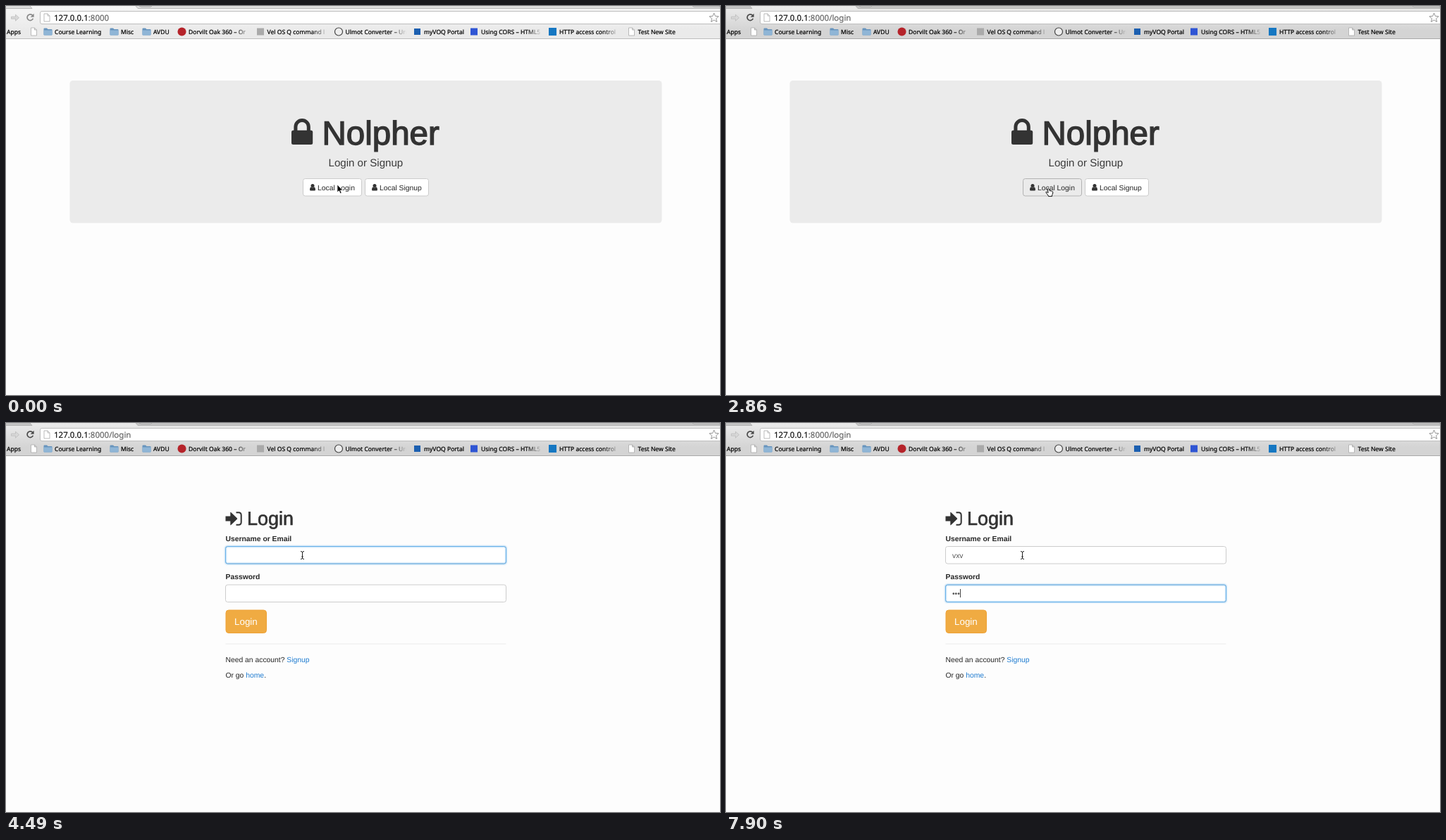
Recreate the animation shown at these times as an HTML page. Size 1013x553 px, loop 8 s.

```html
<!DOCTYPE html>
<html lang="en">
<head>
<meta charset="utf-8">
<title>Login demo</title>
<style>
  html, body { margin: 0; width: 100%; height: 100%; overflow: hidden; background: #fdfdfd; }
  svg { display: block; width: 1013px; height: 553px; }
  text { font: 10.35px "Liberation Sans", Arial, sans-serif; fill: #262626; text-rendering: geometricPrecision; white-space: pre; }
  .ui { font: 8.55px "Noto Sans", sans-serif; fill: #000; stroke: #000; stroke-width: .22px; }
  .faded { stroke: none; }
  .url { font: 11.5px "Noto Sans", sans-serif; fill: #111; stroke: #111; stroke-width: .2px; }
  .url .rest { fill: #666; stroke: #666; }
  .option { font: 10.5px "Noto Sans", sans-serif; fill: #000; stroke: #000; stroke-width: .25px; }
  .label { font-weight: bold; }
  .title { fill: #333; stroke: #333; }
  .typed { fill: #555; }
  .link { fill: #1f7cd0; }
  .button { fill: #fff; stroke: #ccc; }
  .button.hover { fill: #ebebeb; stroke: #b3b3b3; }
  .field { fill: #fff; stroke: #ccc; }
  .glow { fill: none; stroke: #66afe9; }
</style>
</head>
<body>
<svg viewBox="0 0 1013 553" xmlns="http://www.w3.org/2000/svg">
  <defs>
    <linearGradient id="barFill" x2="0" y2="1">
      <stop id="barTop"/><stop id="barEnd" offset=".75"/>
    </linearGradient>
    <path id="file" d="M-3.500-5.500h5l3 3v8h-8zM1.500-5.500v3h3" fill="#fff" stroke="#aaa" stroke-width=".8"/>
    <g id="folder">
      <path d="M-6-4q0-1 1-1h3.500l1.500 1.500h5q1 0 1 1v6.500q0 1-1 1h-10q-1 0-1-1z" fill="#6794bd"/>
      <path d="M-6-2h12v6q0 1-1 1h-10q-1 0-1-1z" fill="#8fb5d6"/>
    </g>
    <g id="person" fill="#333">
      <circle cx="4" cy="2.500" r="2.500"/>
      <path d="M1.800 4.300Q4 6 6.200 4.300Q8 4.800 8 8Q8 9.500 6.700 9.500H1.300Q0 9.500 0 8Q0 4.800 1.800 4.300z"/>
    </g>
  </defs>

  <rect width="1013" height="553" fill="#fdfdfd"/>

  <g id="browser">
    <rect width="1013" height="46" fill="url(#barFill)"/>
    <path id="tabStrip" d="M0 0H34L37 3.500H0zM184 0H1013V3.500H187z"/>
    <path d="M0 3.500H37L34 0M184 0L187 3.500H1013" fill="none" stroke="#adadad" stroke-width=".8"/>
    <path d="M189 0h18l-2 1.500h-13zM974 0h39v1.500h-37z" fill="#ddd" stroke="#999" stroke-width=".6"/>
    <path id="barLine" d="M0 46.500H1013"/>
    <path d="M7.500 15.200h6v-3l5 4.500-5 4.500v-3h-6z" fill="#d8d8d8" stroke="#bbb" stroke-width=".8"/>
    <g id="reload">
      <path d="M37.800 13.600A4.300 4.300 0 1 0 38.400 17.800" fill="none" stroke="currentColor" stroke-width="1.700"/>
      <path d="M39.600 10.800v5h-5z" fill="currentColor"/>
    </g>
    <rect x="48.500" y="7.500" width="980" height="18" rx="2.500" fill="#fff" stroke="#bdbdbd"/>
    <use href="#file" x="57.500" y="16.500"/>
    <text class="url" x="68" y="20.500">127.0.0.1<tspan class="rest">:8000</tspan><tspan class="rest" id="path"></tspan></text>
    <path d="M1004.500 10l1.900 4.400 4.700.4-3.600 3.100 1.100 4.600-4.100-2.500-4.100 2.500 1.100-4.600-3.600-3.100 4.700-.4z" fill="#fff" stroke="#888" stroke-width=".9"/>
    <g id="bookmarks"></g>
  </g>

  <g id="home">
    <rect x="90.500" y="106" width="840" height="202.500" rx="4.500" fill="#ebebeb"/>
    <path d="M410.900 178v-6.200a9.200 9.200 0 0 1 18.400 0v6.200" fill="none" stroke="#333" stroke-width="5"/>
    <rect x="405" y="176.800" width="30.200" height="20.200" rx="2.500" fill="#333"/>
    <text class="title" x="448.500" y="197" style="font-size:47.500px" stroke-width="1.400">Nolpher</text>
    <text x="457.500" y="227.500" style="font-size:15.100px;fill:#3c3c3c">Login or Signup</text>
    <rect id="loginButton" class="button" x="421.500" y="245.500" width="83" height="24.500" rx="3"/>
    <use href="#person" x="431" y="253"/>
    <text x="442" y="261.500">Local Login</text>
    <rect class="button" x="509.500" y="245.500" width="90" height="24.500" rx="3"/>
    <use href="#person" x="519" y="253"/>
    <text x="530" y="261.500">Local Signup</text>
  </g>

  <g id="login">
    <path d="M311.500 132.500h6.800v-5.300q0-1 .9-.2l8.600 8.300q.7.700 0 1.400l-8.600 8.300q-.9.800-.9-.2v-5.300h-6.800z" fill="#333"/>
    <path d="M326.500 127.200h3.500q3.700 0 3.700 3.700v10.200q0 3.700-3.700 3.700h-3.500" fill="none" stroke="#333" stroke-width="2"/>
    <text class="title" x="342" y="145" style="font-size:27px" stroke-width=".7">Login</text>
    <text class="label" x="311.500" y="167.500">Username or Email</text>
    <text class="label" x="311.500" y="222.300">Password</text>
    <g id="fields"></g>
    <text class="typed" id="userText" x="321" y="191.500"></text>
    <text class="typed" id="passText" x="321" y="246"></text>
    <g id="options">
      <rect x="311.500" y="200.500" width="397.500" height="36" fill="#fff" stroke="#9cc6ea"/>
      <text class="option" x="314.800" y="213.700">vxv</text>
      <text class="option" x="314.800" y="231.400">vxv@vxv.test</text>
    </g>
    <rect id="caret" width="1" height="12" fill="#444"/>
    <rect x="312" y="266" width="57.500" height="32.500" rx="4" fill="#f0ab42" stroke="#eea236"/>
    <text x="324" y="287.300" style="font-size:13.400px;fill:#fff">Login</text>
    <path d="M311.500 314H709.500" stroke="#ebebeb"/>
    <text x="311.500" y="340.300">Need an account? <tspan class="link">Signup</tspan></text>
    <text x="311.500" y="362.400">Or go <tspan class="link">home</tspan>.</text>
  </g>

  <g id="pointer">
    <path id="arrow" d="M0 0V10.800L2.500 8.600L4.300 12.600L6.100 11.800L4.400 7.900H7.600z" fill="#000" stroke="#fff" stroke-width=".7"/>
    <path id="hand" d="M-2.200-5.200q1.200-1.200 2 .3l1 2.800q1-.6 1.600.3q1-.5 1.600.4q1.300-.2 1.300 1.200q0 2.800-1.300 4v1.800h-5l-.5-1.600q-1.800-1.700-3.100-4.200q.2-1.500 2-.2l1.200 1z" fill="#fff" stroke="#111" stroke-width="1"/>
    <path id="beam" d="M-2.500-5.500Q0-5.500 0-4Q0-5.500 2.500-5.500M0-4.500V4.500M-2.500 5.500Q0 5.500 0 4Q0 5.500 2.500 5.500M-1.300 2h2.600" fill="none" stroke="#222" stroke-width="1"/>
  </g>
</svg>

<script>
const $ = id => document.getElementById(id);
const show = (id, on) => $(id).setAttribute("display", on ? "inline" : "none");

const dot = (x, color) => `<circle cx="${x}" cy="36.500" r="6" fill="${color}"/>`;
const square = (x, color, size = 10) =>
  `<rect x="${x - size / 2}" y="${36.5 - size / 2}" width="${size}" height="${size}" fill="${color}"/>`;
const icon = (x, id) => `<use href="#${id}" x="${x}" y="36.500"/>`;
const ring = x => `<circle cx="${x}" cy="36.500" r="5.500" fill="#eee" stroke="#444" stroke-width="1.200"/>`;

// [icon, text x, title, x where a long title has faded out]
const bookmarks = [
  ["", 1, "Apps"],
  [icon(39, "file"), 0, ""],
  [icon(59.5, "folder"), 69, "Course Learning"],
  [icon(153.5, "folder"), 163, "Misc"],
  [icon(199.5, "folder"), 209, "AVDU"],
  [dot(249.5, "#b5232a"), 259, "Dorvilt Oak 360 – Or", 346],
  [square(361, "#aaa"), 370.5, "Vel OS Q command l", 456],
  [ring(472), 481.5, "Ulmot Converter – Un", 568],
  [square(583.5, "#1c5fb0", 9), 593, "myVOQ Portal"],
  [square(664, "#2f55d4"), 674, "Using CORS – HTML5", 760],
  [square(775.5, "#1577c2", 11), 785, "HTTP access control", 869],
  [icon(887, "file"), 896.5, "Test New Site"]
];

$("bookmarks").innerHTML = bookmarks.map(([mark, x, title, end], i) => {
  if (!end) return `${mark}<text class="ui" x="${x}" y="39.700">${title}</text>`;
  const paint = `url(#fade${i})`;
  return `<linearGradient id="fade${i}" gradientUnits="userSpaceOnUse" x1="${end - 24}" x2="${end}">
    <stop/><stop offset="1" stop-opacity="0"/></linearGradient>${mark}
    <text class="ui" x="${x}" y="39.700" style="fill:${paint};stroke:${paint}">${title}</text>`;
}).join("");

const fieldBox = (y, attrs) => `<rect x="311.500" y="${y}" width="398" height="24.500" rx="3" ${attrs}/>`;
$("fields").innerHTML = [["userGlow", 175.5], ["passGlow", 230]].map(([id, y]) =>
  fieldBox(y, 'class="field"') + `<g id="${id}" class="glow">` +
  fieldBox(y, 'stroke-width="5" opacity=".1"') +
  fieldBox(y, 'stroke-width="3" opacity=".18"') +
  fieldBox(y, "") + "</g>").join("");

// Each track is a list of [time, ...values]; a value holds until the next entry.
const pointerTrack = [
  [0, "arrow", 470, 254], [2270, "hand", 465, 263], [2420, "hand", 460, 265], [2570, "hand", 458.5, 265],
  [3160, "arrow", 446, 240], [3300, "arrow", 426, 205], [3450, "beam", 420.5, 184], [3750, "beam", 420.5, 188]
];
const typingTrack = [[0, 0], [4790, 1], [4930, 2], [5530, 3]];
const secretTrack = [[0, 0], [7750, 2], [7900, 3]];
const caretTrack = [
  [0, 0], [4040, 1], [4490, 0], [4790, 1], [5380, 0], [5530, 1],
  [6120, 0], [6570, 1], [7010, 0], [7310, 1]
];
const userFocus = [[0, 0], [4040, 0.5], [4190, 1], [7310, 0.5], [7460, 0]];
const passFocus = [[0, 0], [7310, 0.5], [7460, 1]];
const at = (track, t) => track.findLast(([start]) => start <= t).slice(1);

function render(t) {
  const active = t >= 480;
  $("barTop").setAttribute("stop-color", active ? "#ebebeb" : "#f6f6f6");
  $("barEnd").setAttribute("stop-color", active ? "#d4d4d4" : "#eaeaea");
  $("tabStrip").setAttribute("fill", active ? "#c4c4c4" : "#dedede");
  $("barLine").setAttribute("stroke", active ? "#a8a8a8" : "#bdbdbd");
  $("reload").setAttribute("color", active ? "#4a4a4a" : "#888");
  $("path").textContent = t >= 2860 ? "/login" : "";

  const loginOpen = t >= 3010;
  show("home", !loginOpen);
  show("login", loginOpen);
  $("loginButton").classList.toggle("hover", t >= 2270);

  const [typed] = at(typingTrack, t), [secret] = at(secretTrack, t);
  $("userText").textContent = "vxv".slice(0, typed);
  $("passText").textContent = "•".repeat(secret);
  $("userGlow").setAttribute("opacity", at(userFocus, t)[0]);
  $("passGlow").setAttribute("opacity", at(passFocus, t)[0]);
  show("options", t >= 4930 && t < 7310);

  const inPassword = t >= 7310;
  show("caret", at(caretTrack, t)[0]);
  $("caret").setAttribute("x", 321 + Math.round(inPassword ? secret * 3.6 : typed * 5.1));
  $("caret").setAttribute("y", inPassword ? 236 : 182);

  const [shape, x, y] = at(pointerTrack, t);
  for (const id of ["arrow", "hand", "beam"]) show(id, id === shape);
  $("pointer").setAttribute("transform", `translate(${x} ${y})`);
}

let start;
function tick(now) {
  start ??= now;
  render((now - start) % 8000);
  requestAnimationFrame(tick);
}
render(0);
requestAnimationFrame(tick);
</script>
</body>
</html>
```
